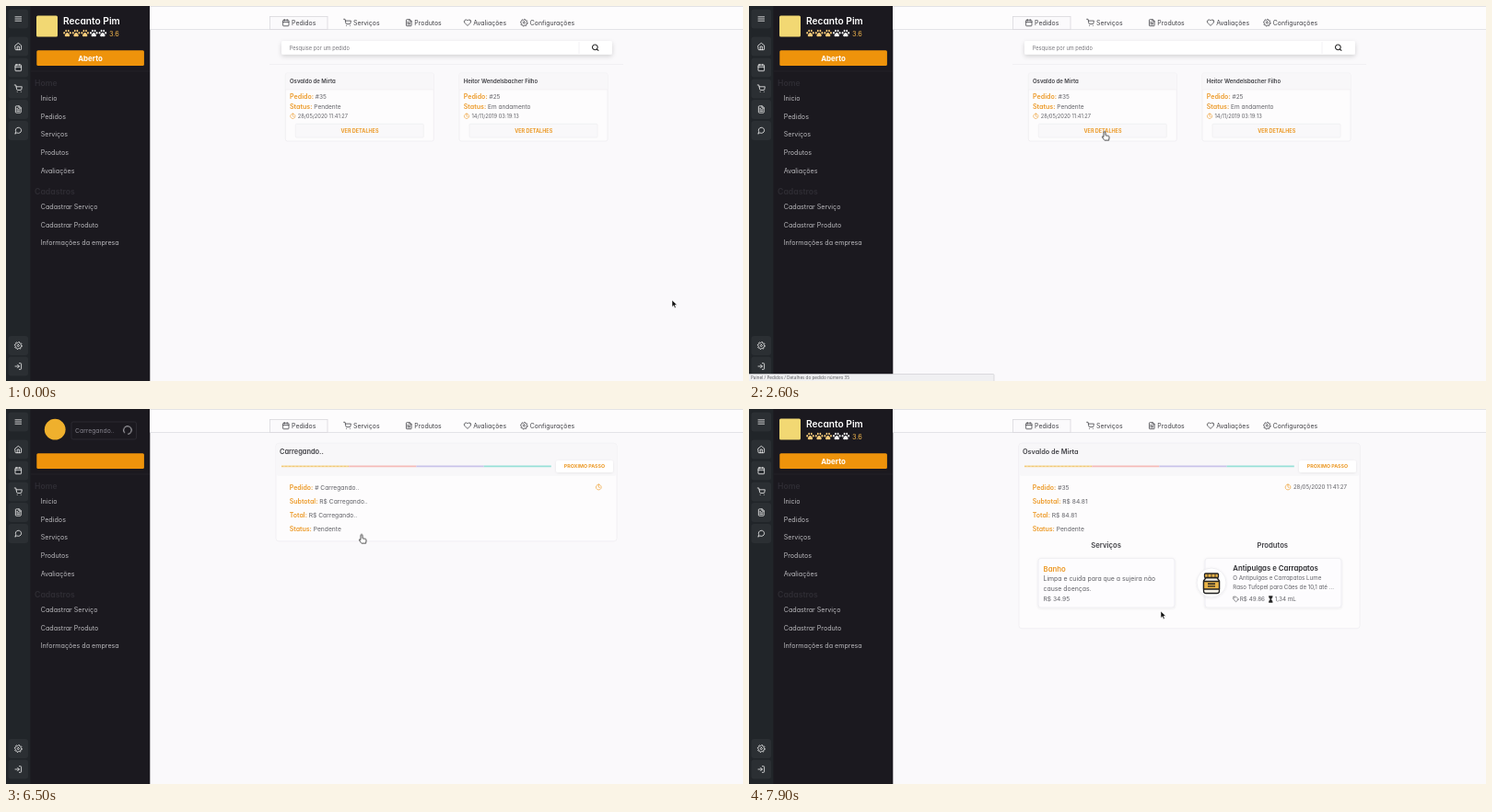
Recreate the animation shown at these times as an HTML page. Size 800 by 408 pixels, loop 8 s.

```html
<!DOCTYPE html>
<html lang="pt-BR">
<head>
<meta charset="utf-8">
<title>Pedidos</title>
<style>
html, body { margin: 0; width: 100%; height: 100%; overflow: hidden; background: #faf9fb; }
svg { display: block; }
#stage { width: 100vw; height: 100vh; }
text { font-family: Inter, "Open Sans", sans-serif; font-feature-settings: "cv11"; white-space: pre; }
.b { font-weight: 600; }
.strong { font-weight: 700; }
.o { fill: #ec9926; }
.icon { fill: none; stroke: currentColor; stroke-linecap: round; stroke-linejoin: round; }

.list, .detail, .loading, .loaded, .shop, .items, .hand, .arrow, .link, .wait, .proxy {
  animation: 8s step-end infinite;
}
.list { animation-name: list; }
.detail { animation-name: detail; }
.loading { animation-name: loading; }
.loaded { animation-name: loaded; }
.shop { animation-name: shop; }
.items { animation-name: items; }
.hand { animation-name: hand; }
.arrow { animation-name: arrow; }
.link { animation-name: link; }
.wait { animation-name: wait; }
.proxy { animation-name: proxy; }
.status { animation: status 8s linear infinite; }
.cursor { animation: move 8s linear infinite; }
.spin { animation: spin calc(8s / 13) linear infinite; transform-origin: 132px 23px; }

@keyframes list { 0% { visibility: visible } 73.75%, 100% { visibility: hidden } }
@keyframes detail { 0% { visibility: hidden } 73.75%, 100% { visibility: visible } }
@keyframes loading { 0% { visibility: hidden } 73.75% { visibility: visible } 85%, 100% { visibility: hidden } }
@keyframes loaded { 0% { visibility: hidden } 85%, 100% { visibility: visible } }
@keyframes shop { 0% { visibility: visible } 73.75% { visibility: hidden } 85%, 100% { visibility: visible } }
@keyframes items { 0% { visibility: hidden } 92.5%, 100% { visibility: visible } }
@keyframes hand { 0% { visibility: hidden } 21.25% { visibility: visible } 85%, 100% { visibility: hidden } }
@keyframes arrow { 0% { visibility: visible } 21.25% { visibility: hidden } 85%, 100% { visibility: visible } }
@keyframes link { 0% { visibility: visible } 38.75%, 100% { visibility: hidden } }
@keyframes wait { 0% { visibility: hidden } 38.75% { visibility: visible } 45%, 100% { visibility: hidden } }
@keyframes proxy { 0% { visibility: hidden } 45%, 100% { visibility: visible } }
@keyframes status {
  0%, 25.1% { opacity: 0 } 32.5%, 77.4% { opacity: 1 } 77.5%, 100% { opacity: 0 }
}
@keyframes move {
  0%, 3.8% { transform: translate(723px, 320px); animation-timing-function: ease-in }
  9% { transform: translate(640px, 290px) }
  15% { transform: translate(527px, 241px) }
  18.75% { transform: translate(445px, 172px) }
  21.25% { transform: translate(400px, 144px); animation-timing-function: ease-out }
  25%, 83.75% { transform: translate(386px, 136.6px) }
  90% { transform: translate(407px, 169.5px) }
  95% { transform: translate(431px, 198px) }
  98.75%, 100% { transform: translate(447px, 220px) }
}
@keyframes spin { from { transform: rotate(153deg) } to { transform: rotate(513deg) } }
</style>
</head>
<body>
<svg id="stage" viewBox="0 0 800 408" preserveAspectRatio="none"></svg>
<script>
const DARK = '#414146', GREY = '#606066', ORANGE = '#ec9926';

const shapes = {
  menu: 'M3 6h18M3 12h18M3 18h18',
  home: 'M3 9l9-7 9 7v11a2 2 0 0 1-2 2H5a2 2 0 0 1-2-2zM9 22V12h6v10',
  calendar: 'M5 4h14a2 2 0 0 1 2 2v14a2 2 0 0 1-2 2H5a2 2 0 0 1-2-2V6a2 2 0 0 1 2-2zM16 2v4M8 2v4M3 10h18',
  cart: 'M1 1h4l2.7 13.4a2 2 0 0 0 2 1.6h9.7a2 2 0 0 0 2-1.6L23 6H6M9 21h.1M20 21h.1',
  file: 'M14 2H6a2 2 0 0 0-2 2v16a2 2 0 0 0 2 2h12a2 2 0 0 0 2-2V8zM14 2v6h6M16 13H8M16 17H8M10 9H8',
  chat: 'M3 21l1.9-5.7A8.5 8.5 0 1 1 8.7 19.1z',
  enter: 'M15 3h4a2 2 0 0 1 2 2v14a2 2 0 0 1-2 2h-4M10 17l5-5-5-5M15 12H3',
  heart: 'M20.8 4.6a5.5 5.5 0 0 0-7.8 0l-1 1-1-1a5.5 5.5 0 0 0-7.8 7.8L12 21.2l8.8-8.8a5.5 5.5 0 0 0 0-7.8z',
  search: 'M11 3a8 8 0 1 0 .1 0zM21 21l-4.4-4.4',
  clock: 'M12 2a10 10 0 1 0 .1 0zM12 6v6l4 2',
  tag: 'M20.6 13.4l-7.2 7.2a2 2 0 0 1-2.8 0L2 12V2h10l8.6 8.6a2 2 0 0 1 0 2.8zM7 7h.1',
  gear: gearPath()
};

function gearPath() {
  const points = Array.from({ length: 32 }, (_, i) => {
    const radius = i % 4 < 2 ? 11 : 8.3, angle = (i + .5) * Math.PI / 16;
    return (12 + radius * Math.cos(angle)).toFixed(1) + ' ' + (12 + radius * Math.sin(angle)).toFixed(1);
  });
  return 'M' + points.join('L') + 'zM12 9a3 3 0 1 0 .1 0z';
}

const text = (x, y, size, fill, content, attrs = '') =>
  `<text x="${x}" y="${y}" font-size="${size}" fill="${fill}" ${attrs}>${content}</text>`;
const rect = (x, y, w, h, fill, attrs = '') =>
  `<rect x="${x}" y="${y}" width="${w}" height="${h}" fill="${fill}" ${attrs}/>`;
const line = (x1, x2, y, stroke, width = 1) =>
  `<path d="M${x1} ${y}H${x2}" stroke="${stroke}" stroke-width="${width}"/>`;
const icon = (name, x, y, size, color, weight = 2.2) =>
  `<path class="icon" d="${shapes[name]}" color="${color}" stroke-width="${weight}" transform="translate(${x - size / 2} ${y - size / 2}) scale(${size / 24})"/>`;
const group = (name, ...parts) => `<g class="${name}">${parts.join('')}</g>`;
const field = (x, y, label, value, size = 7, valueSize = 6.7) =>
  text(x, y, size, GREY, `<tspan class="b o">${label}:</tspan><tspan font-size="${valueSize}"> ${value}</tspan>`);
const MIDDLE = 'text-anchor="middle"', BOLD = 'class="b"', STRONG = 'class="strong"';

const paw = (x, fill) => `<g transform="translate(${x} 29.6)" fill="${fill}">
  <path d="M0 -.6C1.5 -.6 3 2 2.6 3.2Q2 4 0 3.3Q-2 4 -2.6 3.2C-3 2 -1.5 -.6 0 -.6z"/>
  ${[[-3.3, -.4], [-1.3, -2.6], [1.3, -2.6], [3.3, -.4]].map(([cx, cy]) =>
    `<ellipse cx="${cx}" cy="${cy}" rx=".9" ry="1.3"/>`).join('')}</g>`;

function sidebar() {
  const rail = [['menu', 14], ['home', 44], ['calendar', 67], ['cart', 90], ['file', 112.5],
    ['chat', 135.5], ['gear', 369.5], ['enter', 392]];
  const links = [['Inicio', 103.2], ['Pedidos', 122.8], ['Serviços', 142.4], ['Produtos', 162],
    ['Avaliações', 181.7], ['Cadastrar Serviço', 221], ['Cadastrar Produto', 240.7], ['Informações da empresa', 260.4]];
  return [
    rect(0, 0, 156.3, 408, '#1b191f'),
    rect(0, 0, 26.5, 408, '#212529'),
    line(27, 156, 71, '#232127'),
    ...rail.map(([name, y]) => rect(2.5, y - 10.5, 21.5, 21, '#2b2f33', 'rx="3"') + icon(name, 13.3, y, 8.8, '#f2f2f2')),
    rect(33.3, 48.3, 116.6, 16.8, '#ee930b', 'rx="1.5"'),
    text(31, 87, 8.6, '#2f2d34', 'Home', BOLD),
    text(31, 205, 8.7, '#2f2d34', 'Cadastros', BOLD),
    ...links.map(([label, y]) => text(37.7, y, 7.15, '#b9b8bc', label)),
    group('shop',
      rect(33, 10.5, 23, 23, '#f2d873', 'rx="1.5"'),
      text(62, 19.5, 10.2, '#fff', 'Recanto Pim', BOLD),
      ...[0, 1, 2, 3, 4].map(i => paw(66.5 + i * 9.6, i < 3 ? '#f5ca7a' : '#f4f4f4')),
      text(112, 32.5, 7.4, '#f0b44c', '3.6'),
      text(91.5, 59.6, 7.9, '#fff', 'Aberto', `${STRONG} ${MIDDLE}`)),
    group('loading',
      '<circle cx="53.2" cy="22.2" r="11.4" fill="#efb02d"/>',
      rect(71, 14, 70.5, 19, 'none', 'rx="2" stroke="#2b2930"'),
      text(75, 26, 6.8, '#85838d', 'Carregando..'),
      '<path class="spin" d="M128.6 25.7A4.3 4.3 0 1 1 132 27.3" fill="none" stroke="#c4c4c8" stroke-width="1"/>')
  ].join('');
}

function tabs() {
  const items = [['calendar', 303.8, 310, 'Pedidos'], ['cart', 370.5, 377, 'Serviços'], ['file', 437.3, 443.3, 'Produtos'],
    ['heart', 501, 507.3, 'Avaliações'], ['gear', 562.3, 568.7, 'Configurações']];
  return rect(156, 0, 644, 25, '#fdfcfd') + line(156, 800, .4, '#d9d8dc', .8) + line(156, 800, 25.5, '#dedde2', .8) +
    rect(286.5, 11.5, 62.5, 14, '#fbfafc', 'stroke="#d9d8dc" stroke-width=".8"') +
    items.map(([name, x, tx, label]) => icon(name, x, 18.2, 8.5, DARK) + text(tx, 20.8, 6.95, DARK, label)).join('');
}

function orderCard(x, name, number, state, date) {
  return rect(x, 73, 161, 74, '#fdfcfd', 'rx="2" stroke="#eeedf0" stroke-width=".8"') +
    rect(x + .4, 73.4, 160.2, 17.6, '#f8f7f9') + line(x, x + 161, 91, '#efeef1', .7) +
    text(x + 4.7, 84, 6, DARK, name, BOLD) +
    field(x + 4.7, 101.3, 'Pedido', number, 7.1, 6.5) +
    field(x + 4.7, 112, 'Status', state, 7.1, 6.5) +
    icon('clock', x + 8, 119.8, 6.4, ORANGE) +
    text(x + 13.5, 122, 5.7, GREY, date) +
    rect(x + 11, 128.3, 139, 14.7, '#f9f8fa', 'rx="1" stroke="#f0eff2" stroke-width=".8"') +
    text(x + 80.7, 137.7, 5.5, ORANGE, 'VER DETALHES', `${STRONG} ${MIDDLE}`);
}

function orderList() {
  return group('list',
    rect(299, 38, 359, 14.7, '#fff', 'rx="2" filter="url(#soft)"'),
    '<path d="M622 39v13" stroke="#f0eff3" stroke-width=".8"/>',
    text(307.7, 47.6, 5.7, '#77767c', 'Pesquise por um pedido'),
    icon('search', 639.7, 45.2, 8.6, '#222', 3),
    line(286, 670, 63.5, '#efeef2', .8),
    orderCard(303.3, 'Osvaldo de Mirta', '#35', 'Pendente', '28/05/2020 11:41:27'),
    orderCard(492, 'Heitor Wendelsbacher Filho', '#25', 'Em andamento', '14/11/2019 03:19:13'));
}

function orderDetail() {
  const panel = height => rect(293, 37.3, 370, height, '#fdfcfd', 'rx="3" stroke="#efeef1" stroke-width=".8"') +
    rect(293.5, 37.8, 369, 35, '#f8f7f9', 'rx="2"');
  const rows = values => ['Pedido', 'Subtotal', 'Total'].map((label, i) => field(307.7, 87.6 + 15 * i, label, values[i])).join('');
  const steps = ['#f6d795', '#f5bbb8', '#c9c3e9', '#97e0d8'];
  return group('detail', panel(106.5)) + group('items', panel(201.5)) +
    group('detail',
      ...steps.map((color, i) => line(299 + 73.2 * i, 372.2 + 73.2 * i, 62.4, color, 1.6)),
      '<path d="M299 62.4H372" stroke="#f0c878" stroke-width="1" stroke-dasharray="2 2"/>',
      rect(597, 56, 62, 13, '#fff', 'rx="2" filter="url(#faint)"'),
      text(628, 64.3, 5.3, ORANGE, 'PROXIMO PASSO', `${STRONG} ${MIDDLE}`),
      field(307.7, 132.6, 'Status', 'Pendente')) +
    group('loading',
      text(297, 49.2, 7.4, DARK, 'Carregando..', BOLD),
      rows(['# Carregando..', 'R$ Carregando..', 'R$ Carregando..']),
      icon('clock', 643.3, 85, 7, ORANGE)) +
    group('loaded',
      text(297, 49.2, 7.3, DARK, 'Osvaldo de Mirta', BOLD),
      rows(['#35', 'R$ 84.81', 'R$ 84.81']),
      icon('clock', 585, 85, 7, ORANGE),
      text(649, 87.3, 6.1, GREY, '28/05/2020 11:41:27', 'text-anchor="end"'));
}

function orderItems() {
  const card = x => rect(x, 162.5, 148, 53.5, '#fdfcfe', 'rx="3" stroke="#f0eff3" stroke-width="1.2" filter="url(#faint)"');
  const jar = `<g transform="translate(502 189.5)" stroke="#222" stroke-width="1.3" stroke-linejoin="round">
    <path d="M-6 -6H6L8.5 -2.5V8.5Q8.5 11 6 11H-6Q-8.5 11 -8.5 8.5V-2.5z" fill="#f6f3ea"/>
    <rect x="-7.5" y="-10.5" width="15" height="4.5" rx="1" fill="#e9b347"/>
    <path d="M-8.5 -2H8.5V6.5H-8.5z" fill="#e9b347"/>
    <path d="M-4 .8H4M-4 3.4H4" stroke-width="1.4"/>
    <path d="M-4 -10V-6.5M0 -10V-6.5M4 -10V-6.5" stroke-width=".8"/></g>`;
  return group('items',
    text(387.6, 150.5, 7.7, DARK, 'Serviços', `${BOLD} ${MIDDLE}`),
    text(568.3, 150.5, 7.7, DARK, 'Produtos', `${BOLD} ${MIDDLE}`),
    card(314), card(495),
    text(319.5, 177, 7.8, ORANGE, 'Banho', BOLD),
    text(319.5, 187.4, 6.9, GREY, 'Limpa e cuida para que a sujeira não'),
    text(319.5, 198, 6.9, GREY, 'cause doenças.'),
    text(319.5, 208.8, 6.7, GREY, 'R$ 34.95'),
    '<circle cx="502" cy="189" r="16" fill="#fff" stroke="#eeedf1" filter="url(#faint)"/>', jar,
    text(525.3, 176, 7.8, '#2d2d31', 'Antipulgas e Carrapatos', BOLD),
    text(525.3, 186.2, 6.2, GREY, 'O Antipulgas e Carrapatos Lume'),
    text(525.3, 195.8, 6.2, GREY, 'Raso Tufopel para Cães de 10,1 até ...'),
    icon('tag', 528.6, 207, 6.8, DARK),
    text(532.8, 209.4, 6.3, GREY, 'R$ 49.86'),
    '<path d="M564 203.8h4.6M564 210.2h4.6M564.7 204q0 2 1.6 3q-1.6 1-1.6 3h3.2q0-2-1.6-3q1.6-1 1.6-3z" fill="#222" stroke="#222" stroke-width=".8"/>',
    text(570.8, 209.4, 6.3, GREY, '1,34 mL'));
}

function statusBar() {
  const label = (name, content) => group(name,
    text(2, 406.3, 4.7, '#55555a', content, `style="font-family:'Open Sans',sans-serif"`));
  return `<g class="status">${rect(-1, 400.5, 267, 9, '#f0f0f2', 'rx="1" stroke="#cfcfd3" stroke-width=".7"')}
    ${label('link', 'Painel / Pedidos / Detalhes do pedido número 35')}
    ${label('wait', 'Painel / Aguardando resposta do servidor')}
    ${label('proxy', 'Downloading proxy script...')}</g>`;
}

const cursor = `<g class="cursor">
  <path class="arrow" d="M0 0v7.4l1.7-1.6 1.2 2.7 1.3-.6-1.2-2.6h2.4z" fill="#111" stroke="#fff" stroke-width=".5"/>
  <path class="hand" d="M-1 .8a1 1 0 0 1 2 0V4l3 .7q1.3.3 1.1 1.6l-.5 3.2H0L-2.8 5.9q.2-1.2 1.8-.2z" fill="#fff" stroke="#222" stroke-width=".8" stroke-linejoin="round"/></g>`;

const filters = `<defs>
  <filter id="soft" x="-5%" y="-60%" width="110%" height="260%"><feDropShadow dx="0" dy="2" stdDeviation="2.5" flood-opacity=".16"/></filter>
  <filter id="faint" x="-15%" y="-40%" width="130%" height="190%"><feDropShadow dx="0" dy=".6" stdDeviation="1" flood-opacity=".08"/></filter></defs>`;

document.getElementById('stage').innerHTML = filters + rect(156, 0, 644, 408, '#faf9fb') +
  sidebar() + tabs() + orderList() + orderDetail() + orderItems() + statusBar() + cursor;
</script>
</body>
</html>
```
